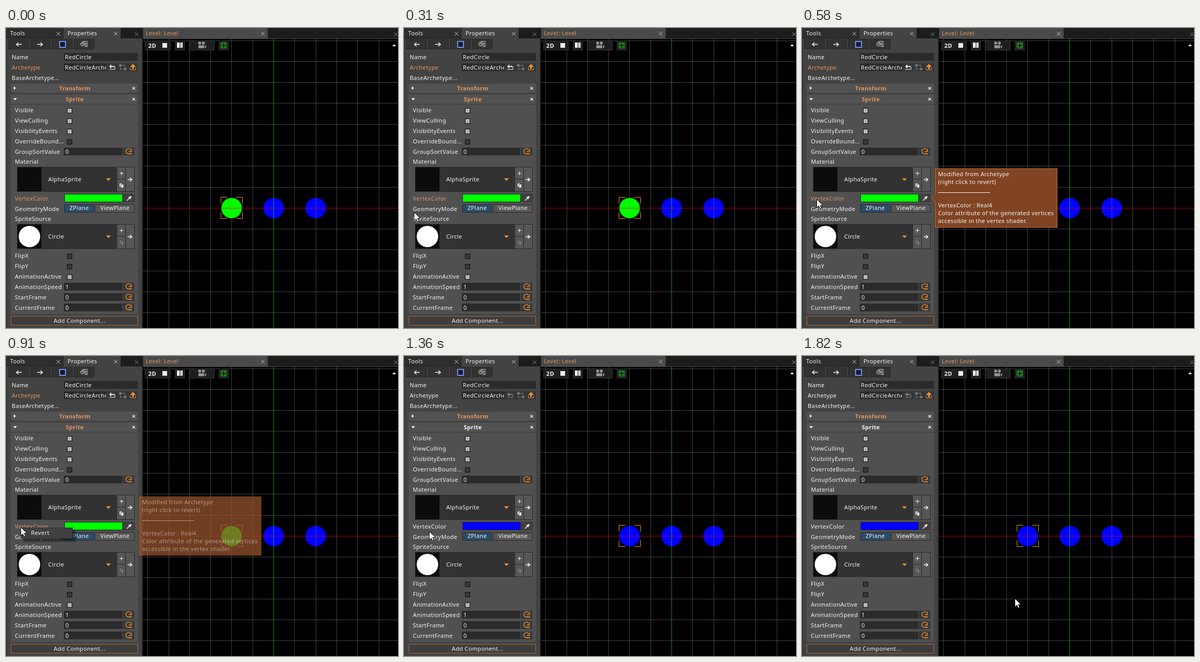
These frames come from a looping animation (752 px wide and 577 px high, 2710 ms). An HTML page with a canvas:

```html
<!DOCTYPE html>
<html lang="en">
<head>
<meta charset="utf-8">
<title>Reverting a property</title>
<style>
html, body { margin: 0; height: 100%; overflow: hidden; background: #000; }
canvas { display: block; }
</style>
</head>
<body>
<canvas id="stage" width="752" height="577"></canvas>
<script>
const ctx = document.getElementById('stage').getContext('2d');
const LOOP = 2710, STEP = 30;
const ORANGE = '#e6955f', AMBER = '#f29030', WHITE = '#f4f4f4', GREY = '#7a7a7a';
const FIELD = '#2b2b2b', BUTTON = '#383838', RAISED = '#565656', EDGE = '#292929';

function rect(x, y, w, h, fill) {
  ctx.fillStyle = fill;
  ctx.fillRect(x, y, w, h);
}

function box(x, y, w, h, fill, edge) {
  rect(x, y, w, h, edge);
  rect(x + 1, y + 1, w - 2, h - 2, fill);
}

function text(str, x, y, color = WHITE, weight = 400, align = 'left') {
  ctx.font = weight + ' 11px "Noto Sans", "Open Sans", sans-serif';
  ctx.letterSpacing = '0.35px';
  ctx.textAlign = align;
  ctx.fillStyle = color;
  ctx.fillText(str, x, y);
}

function trace(points) {
  ctx.beginPath();
  for (let i = 0; i < points.length; i += 2) ctx.lineTo(points[i], points[i + 1]);
}

function line(points, color, width = 1) {
  trace(points);
  ctx.strokeStyle = color;
  ctx.lineWidth = width;
  ctx.stroke();
}

function poly(points, fill) {
  trace(points);
  ctx.fillStyle = fill;
  ctx.fill();
}

function disc(x, y, r, fill) {
  ctx.beginPath();
  ctx.arc(x, y, r, 0, 7);
  ctx.fillStyle = fill;
  ctx.fill();
}

function cross(x, y, r, color, width = 1) {
  line([x - r, y - r, x + r, y + r], color, width);
  line([x - r, y + r, x + r, y - r], color, width);
}

function arrow(x, y, dir, size, color, width = 1.5) {
  const tip = x + dir * size;
  line([x - dir * size, y, tip, y], color, width);
  line([tip - dir * 4, y - 3.5, tip, y, tip - dir * 4, y + 3.5], color, width);
}

function tabs() {
  rect(0, 0, 752, 20, '#1c1c1c');
  rect(0, 0, 109, 19, '#2e2e2e');
  rect(110, 0, 110, 20, '#434343');
  text('Tools', 8, 14);
  text('Properties', 118, 14);
  cross(100.5, 11, 3.5, '#ccc');
  cross(210.5, 11, 3.5, '#ccc');
  cross(250.5, 12, 3.5, '#888');
  rect(263, 0, 239, 20, '#4a4a4a');
  text('Level: Level', 268, 14, ORANGE);
  cross(492.5, 11, 3.5, '#ccc');
  cross(748, 12, 3.5, '#888');
}

function toolbar() {
  for (const x of [4, 46, 88, 130]) box(x, 21, 40, 20, '#323232', EDGE);
  arrow(25, 31.5, -1, 5, WHITE);
  arrow(65, 31.5, 1, 5, WHITE);
  box(102, 25, 13, 13, '#4a78ff', '#8aa6ff');
  rect(104, 27, 9, 9, '#1c1c1c');
  line([147, 26, 157, 26], WHITE);
  for (const y of [29.5, 32.5, 35.5]) line([151, y, 157, y], WHITE);
  ctx.beginPath();
  ctx.arc(147, 31, 3.5, 0, 7);
  ctx.strokeStyle = WHITE;
  ctx.stroke();
  line([147, 29, 147, 31, 149, 31], WHITE);
}

function header(title, y, open, color) {
  rect(9, y, 244, 19, '#525252');
  rect(9, y + 18, 244, 1, '#3a3a3a');
  text(title, 132, y + 13, color, 700, 'center');
  poly(open ? [14, y + 7, 21, y + 7, 17.5, y + 11] : [15, y + 5, 15, y + 12, 19, y + 8.5], WHITE);
  cross(245, y + 9, 2.5, WHITE, 1.3);
}

function archetypeRow(reverted) {
  text('Archetype', 11, 80, reverted ? WHITE : ORANGE);
  rect(111, 68, 142, 15, FIELD);
  ctx.save();
  ctx.beginPath();
  ctx.rect(111, 66, 81, 19);
  ctx.clip();
  text('RedCircleArchetype', 113, 80);
  ctx.restore();
  for (const x of [193, 213, 233]) box(x, 68, 20, 15, BUTTON, '#333');
  const c = reverted ? '#858585' : WHITE;
  poly([198, 74, 202, 70, 202, 78], c);
  line([201, 74, 208, 74], c, 2);
  line([198, 79.5, 209, 79.5, 209, 74], c);
  rect(217, 70, 5, 4, GREY);
  rect(226, 77, 5, 4, GREY);
  line([223, 71.5, 228, 71.5, 228, 76], GREY);
  line([219.5, 75, 219.5, 79.5, 224, 79.5], GREY);
  poly([238, 75, 243.5, 69, 249, 75], AMBER);
  rect(242, 74, 3, 5, AMBER);
  line([238.5, 77, 238.5, 80.5, 248.5, 80.5, 248.5, 77], AMBER);
}

function checkRow(label, y, on) {
  text(label, 17, y + 4);
  box(117, y - 4, 10, 10, on ? '#b4b4b4' : '#383838', '#0d0d0d');
}

function numberRow(label, y, value) {
  text(label, 17, y + 5);
  rect(111, y - 7, 112, 15, FIELD);
  text(value, 114, y + 5);
  box(224, y - 7, 22, 15, BUTTON, '#333');
  ctx.beginPath();
  ctx.arc(235, y, 5, 0.8, 5.5);
  ctx.strokeStyle = AMBER;
  ctx.lineWidth = 1.5;
  ctx.stroke();
  line([240.5, y - 5, 240.5, y + .5, 235.5, y + .5], AMBER, 1.5);
  line([236, y + 5, 242, y + 5], AMBER, 1.5);
}

function resource(name, y, copyColor) {
  box(21, y, 226, 48, '#323232', EDGE);
  rect(22, y + 1, 46, 46, '#0c0c0c');
  text(name, 81, y + 28);
  poly([192, y + 22, 201, y + 22, 196.5, y + 27], AMBER);
  box(212, y, 18, 24, RAISED, EDGE);
  box(212, y + 23, 18, 25, RAISED, EDGE);
  box(229, y, 18, 48, RAISED, EDGE);
  rect(218, y + 12, 7, 1, WHITE);
  rect(221, y + 9, 1, 7, WHITE);
  rect(218, y + 32, 4, 6, copyColor);
  box(220, y + 33, 5, 7, copyColor, '#555');
  rect(221, y + 34, 4, 6, copyColor);
  arrow(237.5, y + 24.5, 1, 4, WHITE);
}

function modeButton(label, x, w, fill) {
  box(x, 339, w, 16, fill, EDGE);
  text(label, x + w / 2, 350, WHITE, 400, 'center');
}

function properties(reverted) {
  rect(0, 20, 261, 557, '#434343');
  rect(0, 20, 2, 557, '#333');
  rect(261, 0, 2, 577, '#1c1c1c');
  tabs();
  toolbar();
  text('Name', 11, 60);
  rect(111, 48, 142, 15, FIELD);
  text('RedCircle', 113, 60);
  archetypeRow(reverted);
  text('BaseArchetype...', 11, 100);
  const modified = reverted ? WHITE : ORANGE;
  header('Transform', 107, false, ORANGE);
  rect(9, 128, 244, 422, '#505050');
  header('Sprite', 128, true, modified);
  checkRow('Visible', 158, true);
  checkRow('ViewCulling', 178, true);
  checkRow('VisibilityEvents', 198, true);
  checkRow('OverrideBound...', 218, false);
  numberRow('GroupSortValue', 237, '0');
  text('Material', 17, 261);
  resource('AlphaSprite', 267, WHITE);
  text('VertexColor', 17, 332, modified);
  box(112, 319, 112, 16, reverted ? '#00f' : '#0f0', EDGE);
  box(225, 319, 22, 16, '#404040', '#383838');
  line([232, 332, 237, 327], WHITE, 1.5);
  line([235, 325, 239, 329], WHITE, 1.5);
  line([237, 327, 240, 324], WHITE, 3);
  text('GeometryMode', 17, 352);
  modeButton('ZPlane', 112, 57, '#2b4c69');
  modeButton('ViewPlane', 171, 76, RAISED);
  text('SpriteSource', 17, 371);
  resource('Circle', 377, '#777');
  disc(45, 401, 20.6, '#fff');
  checkRow('FlipX', 438, false);
  checkRow('FlipY', 458, false);
  checkRow('AnimationActive', 478, true);
  numberRow('AnimationSpeed', 497, '1');
  numberRow('StartFrame', 517, '0');
  numberRow('CurrentFrame', 537, '0');
  box(9, 554, 244, 18, '#3d3d3d', '#b06a38');
  text('Add Component...', 141, 567, WHITE, 400, 'center');
}

function viewport(reverted) {
  rect(263, 20, 489, 1, '#4a4a4a');
  rect(263, 21, 489, 556, '#000');
  for (let i = 0; i < 3; i++)
    disc(432.8 + i * 80.56, 346.4, 19.7, i || reverted ? '#00f' : '#0f0');
  // Translucent grid and axes lie over the sprites.
  const grid = 'rgba(128,128,128,.5)';
  for (let i = -6; i < 6; i++)
    rect(Math.round(513 + i * 40.3), 21, 1, 556, i ? grid : 'rgba(0,255,0,.6)');
  for (let i = -8; i < 6; i++)
    rect(263, Math.floor(346.32 + i * 40.28), 489, 1, i ? grid : 'rgba(255,0,0,.67)');
  for (const [x, dx] of [[412.5, 12], [453.5, -12]])
    for (const [y, dy] of [[325.5, 12], [366.5, -12]])
      line([x + dx, y, x, y, x, y + dy], '#f5962a');

  box(267, 24, 49, 19, '#202020', '#2c2c2c');
  text('2D', 273, 38, WHITE, 700);
  rect(300, 29, 9, 9, '#eee');
  box(324, 24, 19, 19, '#202020', '#2c2c2c');
  rect(328, 28, 5, 10, '#fff');
  rect(334, 28, 5, 10, '#ccc');
  box(351, 24, 49, 19, '#1e1e1e', '#3a3a3a');
  disc(371.5, 29, 3, '#909090');
  disc(378.5, 29, 3, '#909090');
  rect(369, 33, 11, 6, '#909090');
  poly([380, 36, 384, 33, 384, 39], '#909090');
  box(408, 24, 19, 19, '#202020', '#2c2c2c');
  box(412, 28, 11, 11, '#0a2a0a', '#25b825');
  for (const x of [414, 419]) for (const y of [30, 35]) rect(x, y, 2, 2, '#2fe02f');
  poly([741, 35, 748, 35, 744.5, 31], WHITE);
}

function preview() {
  poly([257, 401, 264, 394, 264, 408], '#222');
  line([263.5, 394, 257, 401, 263.5, 408], '#666');
  box(263, 334, 134, 134, '#0d0d0d', '#707070');
  disc(330, 401, 58.5, '#888');
  disc(330, 401, 57.7, '#fff');
}

function tooltip(alpha) {
  ctx.globalAlpha = alpha;
  box(255, 270, 235, 114, '#804423', '#bd7040');
  poly([249, 327, 256, 320, 256, 334], '#804423');
  line([255.5, 320, 249, 327, 255.5, 334], '#bd7040');
  text('Modified from Archetype', 261, 285);
  text('(right click to revert)', 261, 300);
  rect(261, 316, 100, 1, WHITE);
  text('VertexColor : Real4', 261, 345);
  text('Color attribute of the generated vertices', 261, 360);
  text('accessible in the vertex shader.', 261, 375);
  ctx.globalAlpha = 1;
}

function menu(hot) {
  rect(34, 336, 101, 22, 'rgba(0,0,0,.25)');
  rect(32, 334, 100, 21, 'rgba(0,0,0,.3)');
  box(28, 330, 100, 21, hot ? '#3f6d96' : '#404040', hot ? '#35597a' : '#333');
  text('Revert', 48, 344);
}

function pointer(x, y) {
  const shape = [0, 0, 0, 16, 3.7, 12.6, 6.2, 18, 8.8, 16.8, 6.4, 11.6, 11.5, 11.3];
  ctx.save();
  ctx.translate(Math.round(x) + .5, Math.round(y) + .5);
  ctx.lineJoin = 'round';
  poly(shape, '#fff');
  ctx.closePath();
  ctx.strokeStyle = '#111';
  ctx.lineWidth = 1;
  ctx.stroke();
  ctx.restore();
}

// Pointer legs: end time, x, y, easing into that point.
const linear = p => p, easeIn = p => p * p, easeOut = p => p * (2 - p);
const legs = [
  [70, 564, 562, linear], [190, 27, 388, easeOut], [250, 13, 370, easeOut],
  [520, 28, 329, easeOut], [910, 28, 329, linear], [1030, 48, 337, easeOut],
  [1430, 48, 337, linear], [1610, 199, 414, easeIn], [1820, 408, 466, easeOut]
];

function pointerAt(t) {
  const i = legs.findIndex(leg => t < leg[0]);
  if (i < 0) return legs.at(-1).slice(1, 3);
  const [t0, x0, y0] = legs[i - 1], [t1, x1, y1, ease] = legs[i];
  const p = ease((t - t0) / (t1 - t0));
  return [x0 + (x1 - x0) * p, y0 + (y1 - y0) * p];
}

function draw(time) {
  const t = time < 70 ? 0 : 70 + Math.floor((time - 70) / STEP) * STEP;
  const reverted = time >= 1360;
  properties(reverted);
  viewport(reverted);
  if (time >= 550 && time < 940) tooltip(time < 580 || time >= 910 ? 0.5 : 1);
  if (time >= 710 && time < 1360) menu(time >= 940);
  if (time < 70) return;
  const [x, y] = pointerAt(t);
  if (x > 21 && x < 247 && y > 376 && y < 425) preview();
  pointer(x, y);
}

const start = performance.now();
function tick() {
  draw((performance.now() - start) % LOOP);
  requestAnimationFrame(tick);
}
tick();
</script>
</body>
</html>
```
